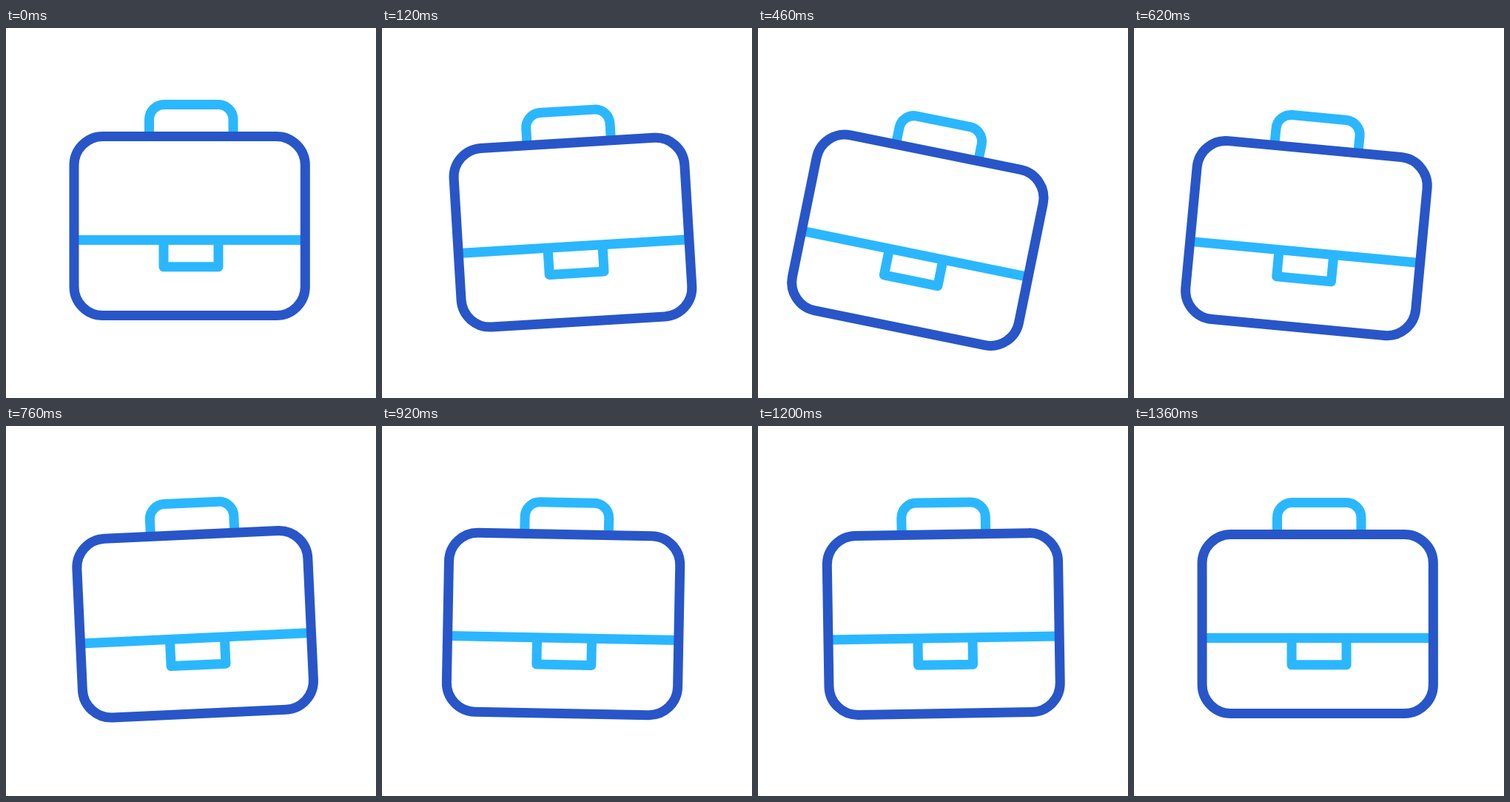
An HTML page that plays this animation: 500 by 500 pixels, repeating every 1.38 s.

```html
<!DOCTYPE html>
<html lang="en">
<head>
<meta charset="utf-8">
<title>Swinging briefcase</title>
<style>
  html, body { margin: 0; width: 100%; height: 100%; overflow: hidden; background: #fff; }
  svg { display: block; width: 100%; height: 100%; }
</style>
</head>
<body>
<svg viewBox="0 0 500 500">
  <g id="bag" fill="none" stroke-width="13" stroke-linejoin="round">
    <g stroke="#2ab7ff">
      <path d="M193.5 146V123.500a20 20 0 0 1 20-20h73.500a20 20 0 0 1 20 20V146"/>
      <path d="M92 286.500H404"/>
      <path d="M213 286.500V322.800H287V286.500"/>
    </g>
    <rect x="92" y="146.500" width="312.300" height="242" rx="39" stroke="#2856c8"/>
  </g>
</svg>
<script>
  const LOOP = 1380, STEP = 20;
  const PIVOT = [250, 105];
  // [time in ms, value]
  const SWING = [[0, 0], [280, -8.9], [480, 12], [780, -2.8], [980, 2.1], [1180, -0.95], [LOOP, 0]];
  const DROP = [[0, 0], [280, 22.8], [545, 22.8], [778, 0], [LOOP, 0]];
  const bag = document.getElementById('bag');

  const ease = u => (1 - Math.cos(Math.PI * u)) / 2;

  function valueAt(keys, t) {
    const i = keys.findIndex(k => k[0] > t);
    const [t0, a] = keys[i - 1], [t1, b] = keys[i];
    return a + (b - a) * ease((t - t0) / (t1 - t0));
  }

  function draw(ms) {
    const t = Math.floor((ms % LOOP) / STEP) * STEP;
    const angle = valueAt(SWING, t), y = valueAt(DROP, t);
    bag.setAttribute('transform', `translate(0 ${y}) rotate(${angle} ${PIVOT})`);
  }

  let start;
  function tick(now) {
    start ??= now;
    draw(Math.max(0, now - start));
    requestAnimationFrame(tick);
  }
  draw(0);
  requestAnimationFrame(tick);
</script>
</body>
</html>
```
